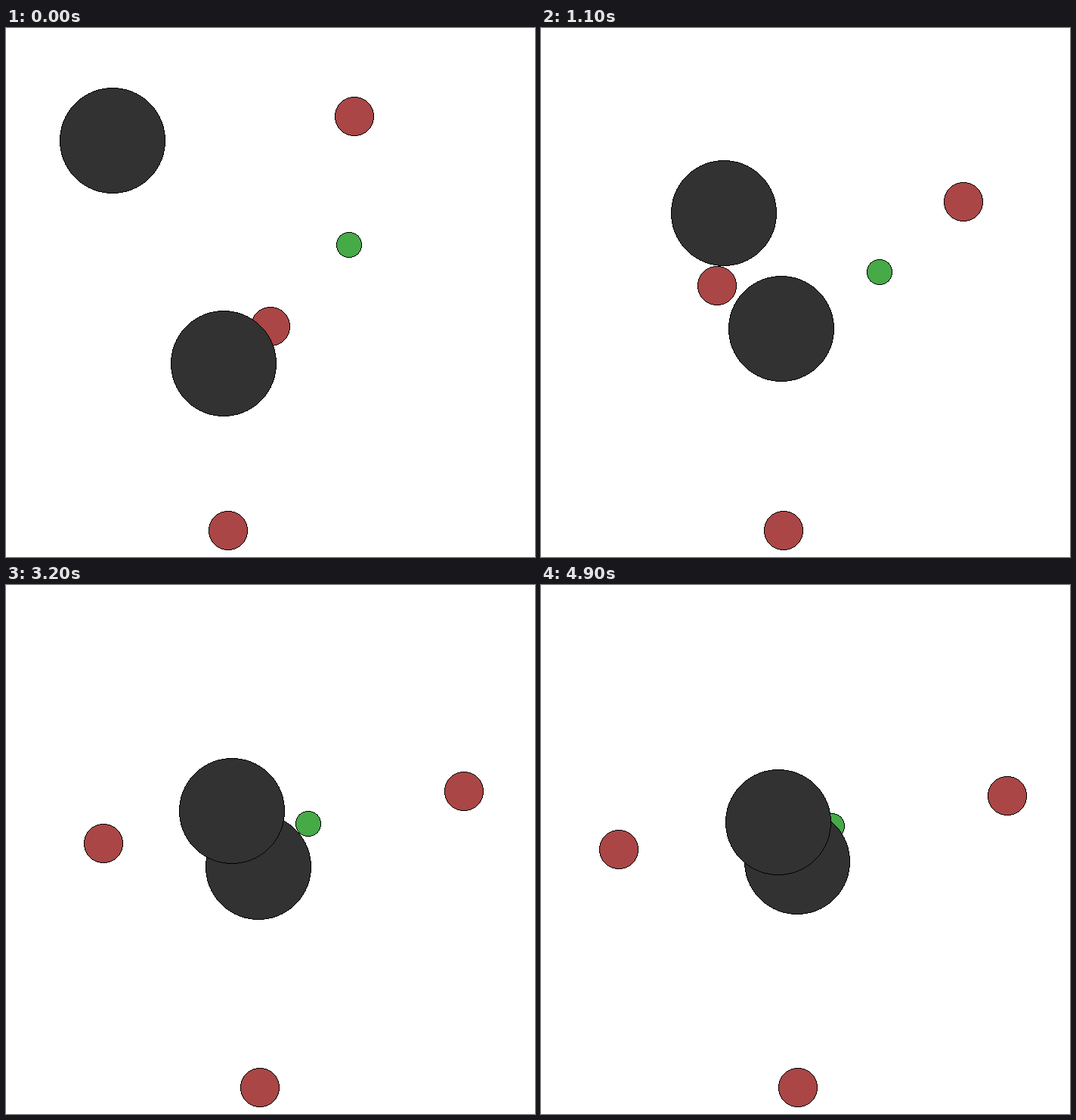
An HTML page with a canvas that plays this animation: 700x700 px, repeating every 5000 ms.

```html
<!DOCTYPE html>
<html>
<head>
<meta charset="utf-8">
<style>
html, body { margin: 0; width: 100%; height: 100%; overflow: hidden; background: #fff; }
canvas { display: block; }
</style>
</head>
<body>
<canvas id="stage" width="700" height="700"></canvas>
<script>
const ctx = document.getElementById('stage').getContext('2d');
const STEP = 100, STEPS = 50;
const RED = '#aa4646', GREEN = '#46aa46', DARK = '#323232';

// Distance between the dark discs: capped speed, then slowing with its square.
const START_GAP = 330, SPEED = 16.3, CAPPED = 7, DECAY = 0.0663;

function gap(n) {
  if (n < CAPPED) return START_GAP - SPEED * n;
  return (START_GAP - SPEED * CAPPED) / (1 + DECAY * (n - CAPPED));
}

function progress(n) {
  return (START_GAP - gap(n)) / (START_GAP - gap(STEPS - 1));
}

// Waypoints are [progress, x, y]; balls are listed back to front.
const balls = [
  { r: 26, color: RED, path: [[0, 461, 117], [0.69, 577, 251], [0.825, 595, 268], [1, 617, 279]] },
  { r: 26, color: RED, path: [[0, 350, 395], [0.418, 285, 340], [0.911, 129, 342], [1, 103, 350]] },
  { r: 26, color: RED, path: [[0, 294, 665], [1, 340, 665]] },
  { r: 17, color: GREEN, path: [[0, 454, 287], [0.418, 466, 321], [0.69, 436, 325], [0.825, 414, 314], [1, 385, 319]] },
  { r: 70, color: DARK, path: [[0, 288, 444], [1, 339, 366]] },
  { r: 70, color: DARK, path: [[0, 141, 149], [1, 314, 314]] }
];

function position(path, p) {
  let i = 1;
  while (i < path.length - 1 && p > path[i][0]) i++;
  const [p0, x0, y0] = path[i - 1], [p1, x1, y1] = path[i];
  const u = (p - p0) / (p1 - p0);
  return [Math.round(x0 + (x1 - x0) * u), Math.round(y0 + (y1 - y0) * u)];
}

// Half width of a disc's pixel row, without antialiasing.
function halfWidth(r, row) {
  return Math.round(Math.sqrt(Math.max(0, r * r - (row + 0.5) ** 2)));
}

function disc(x, y, r, color) {
  for (let row = -r; row < r; row++) {
    const outer = halfWidth(r, row);
    const inner = Math.min(outer - 1, halfWidth(r, row - 1), halfWidth(r, row + 1));
    ctx.fillStyle = '#000';
    ctx.fillRect(x - outer, y + row, outer * 2, 1);
    if (inner > 0) {
      ctx.fillStyle = color;
      ctx.fillRect(x - inner, y + row, inner * 2, 1);
    }
  }
}

function draw(n) {
  ctx.fillStyle = '#fff';
  ctx.fillRect(0, 0, 700, 700);
  const p = progress(n);
  for (const { r, color, path } of balls) {
    const [x, y] = position(path, p);
    disc(x, y, r, color);
  }
}

const start = performance.now();
function tick() {
  draw(Math.floor((performance.now() - start) / STEP) % STEPS);
  requestAnimationFrame(tick);
}
tick();
</script>
</body>
</html>
```
